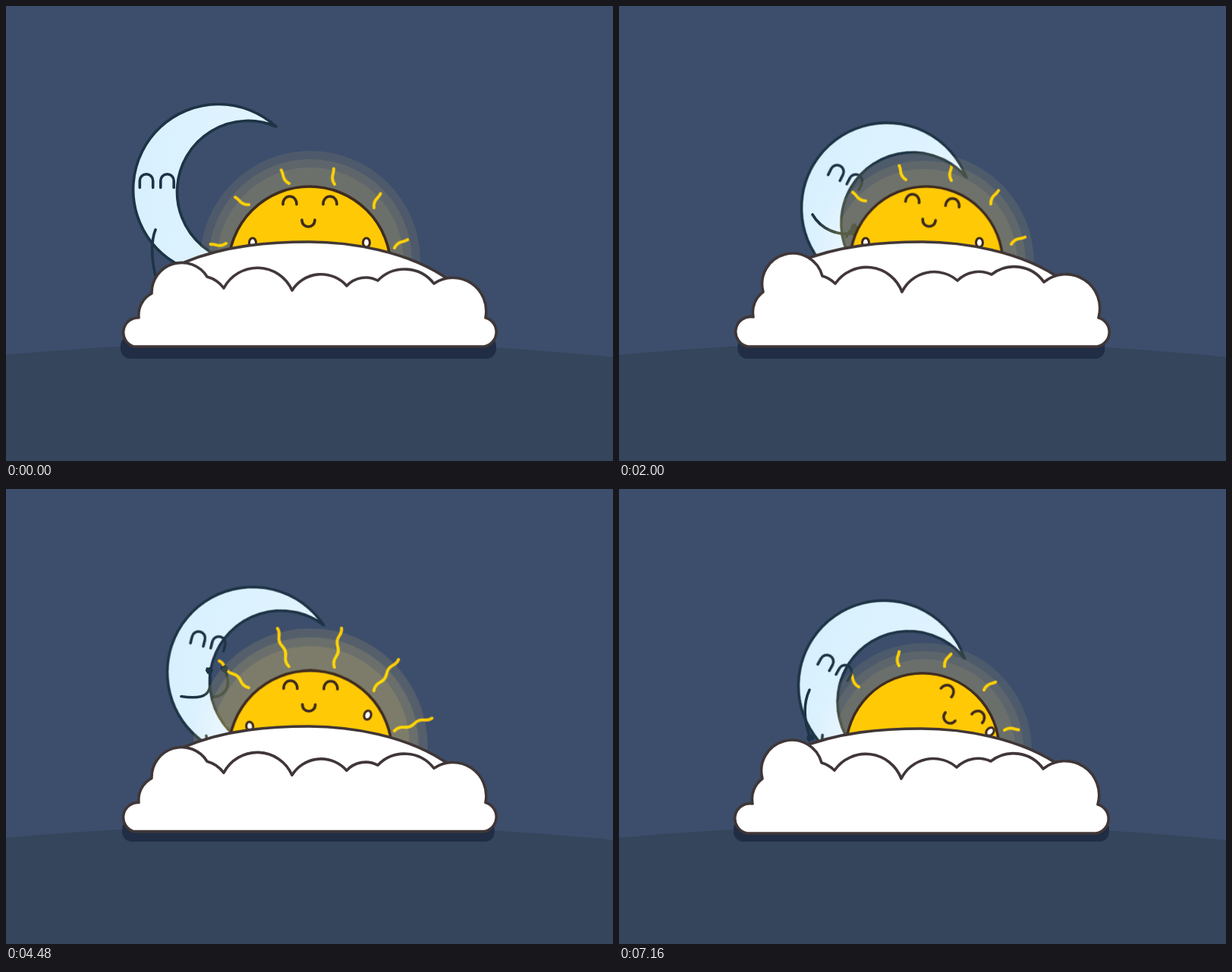
An HTML page without scripts that plays this animation: 800x600 px, repeating every 7200 ms.

```html
<!DOCTYPE html>
<html lang="en">
<head>
<meta charset="utf-8">
<title>Sleepy sun and moon</title>
<style>
html, body { margin: 0; width: 100%; height: 100%; overflow: hidden; background: #3c4e6b; }
svg { display: block; width: 100%; height: 100%; }
.line { fill: none; stroke-width: 3.6; stroke-linecap: round; stroke-linejoin: round; }
.night { stroke: #1d3446; }
.warm { stroke: #3e2b1f; }
.a, .bob, .ray { animation: 7.2s ease-in-out infinite; }

.bob { animation-name: bob; }
#halo { mix-blend-mode: screen; }
#bed { animation-name: bed; transform-origin: 400px 450px; }
#shadow { animation-name: shadow; transform-origin: 400px 450px; }
#quilt { animation-name: quilt; }
#disc { animation-name: disc; }
#glow { animation-name: glow; }
#rays { animation-name: rays; }
.ray { animation-name: ray; }
#face { animation-name: face; transform-origin: 400.5px 256px; }
#smile { animation-name: smile; animation-timing-function: step-end; }
#yawn { animation-name: yawn; transform-origin: 399px 282px; }
#handL { animation-name: hand-l; transform-origin: 325px 312px; }
#handR { animation-name: hand-r; transform-origin: 475px 312px; }
#moon { animation-name: moon; }
#gaze { animation-name: gaze; }
#armL { animation-name: arm-l; }
#armR { animation-name: arm-r; }

/* breathing, about one second per breath */
@keyframes bob {
  0% { transform: none; animation-timing-function: ease-out; }
  4.81%, 18.52%, 32.22%, 45.93%, 59.63%, 73.33%, 87.04% { transform: translateY(5px); }
  11.67%, 39.07%, 52.78%, 66.48%, 80.18%, 93.89% { transform: translateY(-5px); }
  25.37% { transform: translateY(-5px); animation-timing-function: ease-in; }
  27.78%, 41.11% { transform: none; animation-timing-function: ease-out; }
  71.67% { transform: translateY(2px); }
  99.44%, 100% { transform: translateY(5px); }
}
@keyframes bed {
  0% { transform: none; animation-timing-function: ease-out; }
  4.81%, 18.52%, 32.22%, 45.93%, 59.63%, 73.33%, 87.04% { transform: translateY(5px); }
  11.67%, 39.07%, 52.78%, 66.48%, 80.18%, 93.89% { transform: translateY(-3px) scaleY(1.015); }
  25.37% { transform: translateY(-3px) scaleY(1.015); animation-timing-function: ease-in; }
  27.78%, 41.11% { transform: none; animation-timing-function: ease-out; }
  71.67% { transform: translate(-1px, 1.5px); }
  99.44%, 100% { transform: translate(-1px, 5px); }
}
@keyframes shadow {
  0%, 4.81%, 18.52%, 32.22%, 45.93%, 59.63%, 71.67%, 73.33%, 87.04%, 99.44%, 100% { transform: none; }
  11.67%, 25.37%, 39.07%, 52.78%, 66.48%, 80.18%, 93.89% { transform: scaleX(.972); }
  27.78%, 41.11% { transform: scaleX(.978); }
}
@keyframes quilt {
  0%, 18%, 64%, 84% {
    d: path("M168 449A19.5 19.5 0 0 1 175 411A32 32 0 0 1 192 379A39.5 39.5 0 0 1 265 357A40 40 0 0 1 287 372A50 50 0 0 1 377 375A45 45 0 0 1 449 369A34 34 0 0 1 490 362A49 49 0 0 1 564 366A44 44 0 0 1 632 411A19.5 19.5 0 0 1 630 449Z");
  }
  27.5%, 41.11%, 99%, 100% {
    d: path("M170 449A19.5 19.5 0 0 1 177 410A33 33 0 0 1 190 377A40 40 0 0 1 268 356A40 40 0 0 1 285 366A50 50 0 0 1 373 377A47 47 0 0 1 446 362A40 40 0 0 1 491 354A48 48 0 0 1 560 364A45 45 0 0 1 632 411A19.5 19.5 0 0 1 630 449Z");
  }
}

@keyframes disc {
  0% { transform: translate(400px, 238px); }
  11.67%, 20% { transform: translate(401px, 238px); }
  27.78% { transform: translate(405px, 238px) scale(.94); }
  41.11% { transform: translate(400px, 238px) scale(.94); }
  52.78%, 60% { transform: translate(401px, 238px) scale(1.01); }
  71.67% { transform: translate(401px, 231px) scale(.97); }
  80%, 100% { transform: translate(400px, 238px) scale(.945); }
}
@keyframes glow {
  0%, 20% { transform: translate(401px, 336px); fill-opacity: .09; }
  27.78% { transform: translate(402px, 338px); fill-opacity: .095; }
  43% { transform: translate(401px, 336px); fill-opacity: .095; }
  52.78%, 58% { transform: translate(401px, 336px) scale(1.07); fill-opacity: .13; }
  71.67% { transform: translate(401px, 336px) scale(1.045); fill-opacity: .105; }
  80%, 100% { transform: translate(402px, 340px) scale(.98); fill-opacity: .085; }
}
@keyframes rays {
  0% { transform: none; }
  11.67%, 20% { transform: translateY(-2px); }
  27.78% { transform: translate(5px, -5px); }
  41.11% { transform: translateY(-5px); }
  52.78%, 58% { transform: none; }
  71.67% { transform: translate(-1px, -10px); }
  80%, 100% { transform: translate(-4px, -6px); }
}
@keyframes ray {
  0% { transform: none; stroke-dasharray: 21 200; }
  11.67%, 20% { transform: rotate(2deg) translateX(5px); stroke-dasharray: 21 200; }
  27.78% { transform: rotate(5deg); stroke-dasharray: 21 200; }
  43% { transform: rotate(6deg); stroke-dasharray: 20 200; }
  52.78%, 58% { transform: rotate(17deg); stroke-dasharray: 87 200; }
  66%, 71.67% { transform: rotate(17deg); stroke-dasharray: 27 200; }
  80%, 100% { transform: rotate(31deg); stroke-dasharray: 19 200; }
}
@keyframes face {
  0%, 20% { transform: none; }
  27.78%, 33% { transform: translate(13px, 0) rotate(6deg); }
  41.11% { transform: translate(-2px, 0); }
  50%, 61% { transform: none; }
  71.67% { transform: translate(35.5px, 3.5px) rotate(25deg); }
  78%, 100% { transform: translate(54.5px, 20.5px) rotate(40deg); }
}
@keyframes smile {
  0% { opacity: 1; }
  47% { opacity: 0; }
  61.5% { opacity: 1; }
}
@keyframes yawn {
  0%, 46.9% { transform: scale(.4); opacity: 0; }
  47% { transform: scale(.4); opacity: 1; }
  52%, 58% { transform: none; opacity: 1; }
  61.4% { transform: scale(.4); opacity: 1; }
  61.5%, 100% { transform: scale(.4); opacity: 0; }
}
@keyframes hand-l {
  0%, 44% { transform: none; }
  52%, 58% { transform: translate(-6px, -18px) rotate(-15deg); }
  68%, 100% { transform: translateY(28px); }
}
@keyframes hand-r {
  0%, 44% { transform: none; }
  52%, 58% { transform: translate(7px, -17px) rotate(15deg); }
  71.67% { transform: translate(-20px, -11px) rotate(30deg); }
  80%, 100% { transform: translate(14px, 3px) rotate(42deg); }
}

@keyframes moon {
  0%, 21.4% { transform: translate(279px, 242px) rotate(0deg); }
  27.78%, 33% { transform: translate(352px, 266px) rotate(26.6deg); }
  41.11% { transform: translate(342px, 260px) rotate(23deg); }
  50% { transform: translate(324px, 230px) rotate(13deg); }
  52.78% { transform: translate(324px, 238px) rotate(14deg); }
  56.2% { transform: translate(324px, 228px) rotate(13deg); }
  63.2% { transform: translate(324px, 242px) rotate(14deg); }
  71.67%, 76% { transform: translate(324.5px, 243.5px) rotate(14.5deg); }
  84%, 100% { transform: translate(348px, 259px) rotate(29deg); }
}
@keyframes gaze {
  0%, 4% { transform: none; }
  10%, 21.4% { transform: translate(14px, 0); }
  27.78% { transform: translate(15px, -2px); }
  41.11% { transform: translate(13px, -5px); }
  50%, 76% { transform: translate(15px, -15px); }
  84%, 100% { transform: translate(14px, 20px); }
}
@keyframes arm-l {
  0%, 21.4% { d: path("M197 295C190 312 191 345 203 372"); }
  27.78%, 33% { d: path("M255 275C266 294 288 304 310 299"); }
  41.11% { d: path("M246 275C248 322 266 307 278 284"); }
  50% { d: path("M230 262C262 267 272 259 266 228"); }
  52.78% { d: path("M230 269C262 274 272 266 266 235"); }
  56.2% { d: path("M230 260C262 265 272 257 266 226"); }
  63.2%, 76% { d: path("M231 274C264 279 274 271 268 240"); }
  84%, 100% { d: path("M251 265C243 282 243 305 252 328"); }
}
@keyframes arm-r {
  0%, 21.4% { d: path("M245 362C245 364 246 366 247 370"); }
  27.78%, 33% { d: path("M300 304C301 300 306 295 310 292"); }
  41.11% { d: path("M293 312C298 300 297 292 298 280"); }
  50% { d: path("M272 262C290 260 294 244 286 225"); }
  52.78% { d: path("M272 268C290 266 294 250 286 232"); }
  56.2% { d: path("M272 259C290 257 294 241 286 223"); }
  63.2%, 76% { d: path("M274 275C293 272 297 256 288 238"); }
  84%, 100% { d: path("M268 355C268 358 268 362 268 368"); }
}
</style>
</head>
<body>
<svg viewBox="0 0 800 600" preserveAspectRatio="none">
  <defs>
    <path id="wave" d="M0 0q7 -3.4 14 0t14 0t14 0t14 0t14 0t14 0t14 0"/>
    <path id="lid" d="M-9 5C-9 -9 9 -9 9 5"/>
    <path id="tall-lid" d="M-8.7 9V0A8.7 8.7 0 0 1 8.7 0V9"/>
    <marker id="fist" markerUnits="userSpaceOnUse" markerWidth="16" markerHeight="16" refX="8" refY="8" orient="auto">
      <path d="M4 5L9 3L13 5L12 8L13 12L8 13L4 11Z" fill="#1d3446"/>
    </marker>
    <linearGradient id="ice">
      <stop offset="0" stop-color="#d8f0fe"/>
      <stop offset="1" stop-color="#e2f4ff"/>
    </linearGradient>
    <clipPath id="above"><rect width="800" height="420"/></clipPath>
  </defs>

  <rect width="800" height="600" fill="#3c4e6b"/>
  <path d="M0 460Q400 423 800 463V600H0Z" fill="#34455c"/>
  <rect id="shadow" class="a" x="151" y="435" width="495" height="30" rx="13" fill="#202d45"/>

  <g class="bob">
    <g id="rays" class="a" fill="none" stroke="#ffc905" stroke-width="4" stroke-linecap="round">
      <g transform="translate(290 313) rotate(172)"><use href="#wave" class="ray"/></g>
      <g transform="translate(320 262) rotate(204)"><use href="#wave" class="ray"/></g>
      <g transform="translate(373 234) rotate(235)"><use href="#wave" class="ray"/></g>
      <g transform="translate(433 235) rotate(262)"><use href="#wave" class="ray"/></g>
      <g transform="translate(485 266) rotate(290)"><use href="#wave" class="ray"/></g>
      <g transform="translate(512 319) rotate(323)"><use href="#wave" class="ray"/></g>
    </g>
  </g>

  <g id="moon" class="a">
    <path class="line night" style="fill:url(#ice)" d="M77 -83A112.5 112.5 0 1 0 63.6 93.6A93.6 93.6 0 1 1 77 -83Z"/>
    <g id="gaze" class="a line night">
      <use href="#tall-lid" x="-94" y="-11.5"/>
      <use href="#tall-lid" x="-66.5" y="-11.5"/>
    </g>
    <path class="line night" d="M-38 96L-35 103"/>
  </g>
  <path id="armL" class="a line night" marker-end="url(#fist)" d="M197 295C190 312 191 345 203 372"/>
  <path id="armR" class="a line night" marker-end="url(#fist)" d="M245 362C245 364 246 366 247 370"/>

  <g id="halo" class="bob" clip-path="url(#above)">
    <g id="glow" class="a" fill="#ffc300">
      <circle r="145"/>
      <circle r="134"/>
      <circle r="123"/>
    </g>
  </g>
  <g class="bob" clip-path="url(#above)">
    <g id="disc" class="a">
      <circle class="line warm" cy="107" r="107" style="fill:#ffc905"/>
    </g>
    <g id="face" class="a line warm">
      <use href="#lid" x="374" y="256.5"/>
      <use href="#lid" x="427" y="256.5"/>
      <path id="smile" class="a" d="M390 282C390 294 407 294 407 282"/>
      <circle id="yawn" class="a" cx="399" cy="282" r="8.5" fill="#fff"/>
    </g>
    <g class="line warm" style="fill:#fff;stroke-width:3">
      <ellipse id="handL" class="a" cx="325" cy="312" rx="4.5" ry="6"/>
      <ellipse id="handR" class="a" cx="475" cy="312" rx="4.5" ry="6"/>
    </g>
  </g>

  <g id="bed" class="a line" style="fill:#fff;stroke:#403637">
    <path d="M235 338C290 315 350 311 400 311S530 322 585 362V420H235Z"/>
    <path id="quilt" class="a" d="M168 449A19.5 19.5 0 0 1 175 411A32 32 0 0 1 192 379A39.5 39.5 0 0 1 265 357A40 40 0 0 1 287 372A50 50 0 0 1 377 375A45 45 0 0 1 449 369A34 34 0 0 1 490 362A49 49 0 0 1 564 366A44 44 0 0 1 632 411A19.5 19.5 0 0 1 630 449Z"/>
  </g>
</svg>
</body>
</html>
```
